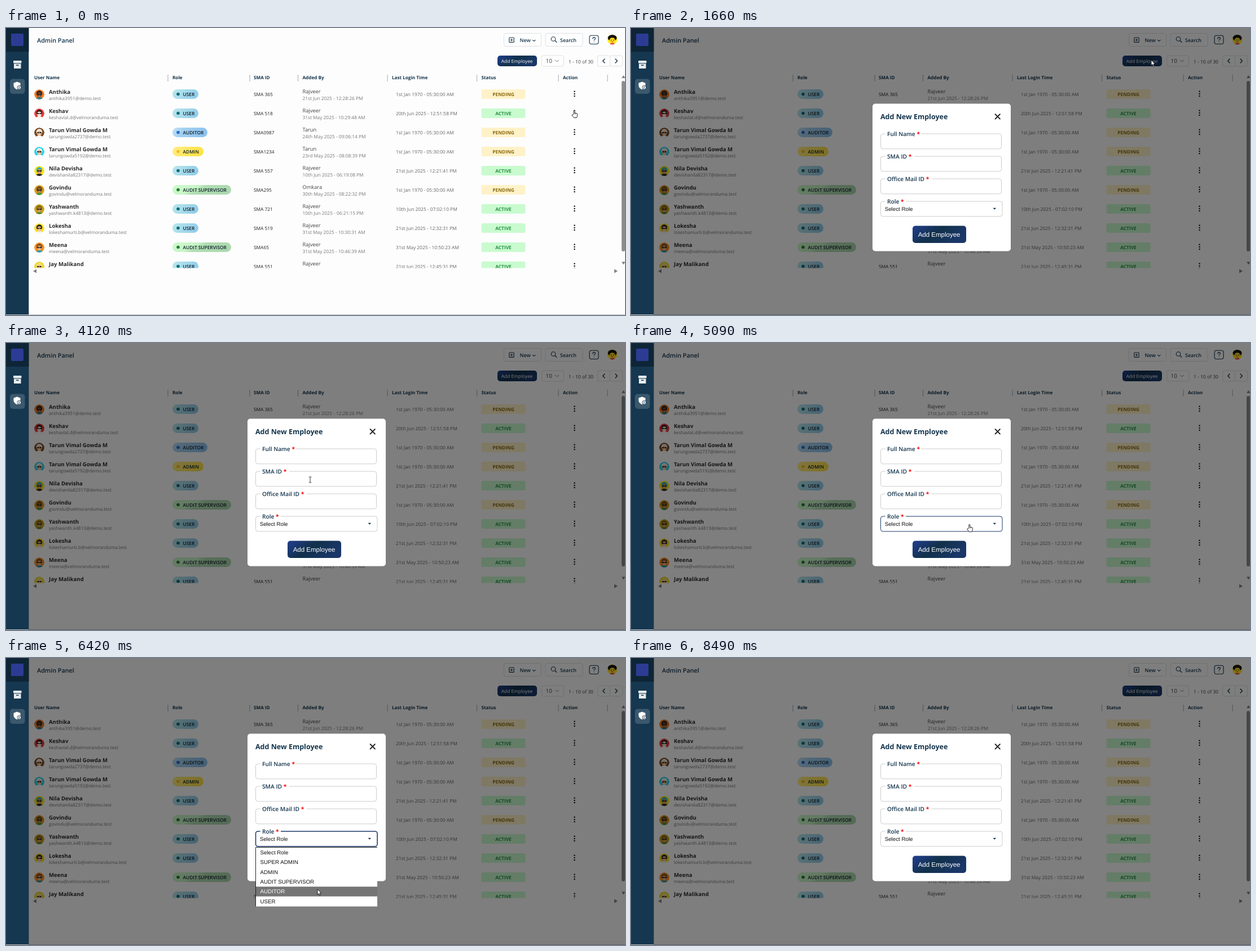
These frames come from a looping animation (1097x510 px, 8.66 s). An HTML page:

```html
<!DOCTYPE html>
<html lang="en">
<head>
<meta charset="utf-8">
<title>Admin Panel</title>
<style>
  html, body { margin: 0; width: 100%; height: 100%; overflow: hidden; background: #fdfdfd; }
  svg { display: block; width: 100vw; height: 100vh; }
  text { font-family: "Open Sans", "Noto Sans", sans-serif; text-rendering: geometricPrecision; white-space: pre; }
  .title { font-size: 10.8px; font-weight: 600; fill: #13344c; }
  .head { font-size: 8.15px; font-weight: 700; fill: #13344c; }
  .name { font-size: 9.6px; font-weight: 700; fill: #2a2a2a; }
  .mail { font-size: 8.1px; fill: #777; }
  .by { font-size: 9.25px; fill: #444; }
  .date { font-size: 8.33px; fill: #777; }
  .login { font-size: 8.4px; fill: #666; }
  .id { font-size: 8.35px; font-weight: 500; fill: #222; }
  .pill { font-size: 8.35px; font-weight: 600; fill: #10202c; }
  .status { font-size: 8.35px; font-weight: 700; text-anchor: middle; }
  .tool { font-size: 8.9px; font-weight: 600; fill: #13344c; }
  .count { font-size: 10px; fill: #444; }
  .range { font-size: 8.5px; fill: #444; }
  .heading { font-size: 12.5px; font-weight: 700; fill: #13344c; }
  .label { font-size: 10.2px; font-weight: 600; fill: #13344c; }
  .small { font-size: 8.35px; fill: #fff; }
  .big, .option { font-family: "Liberation Sans", Arial, sans-serif; }
  .big { font-size: 11.5px; fill: #fff; }
  .option { font-size: 9.75px; fill: #111; }
  .button { fill: #fefefe; stroke: #dde0e4; }
  .field { fill: #fff; stroke: #ccc; }
  .line { fill: none; stroke: #13344c; stroke-width: 1.1; stroke-linecap: round; stroke-linejoin: round; }
</style>
</head>
<body>
<script>
const LOOP = 8660;
const ROW = 34;
const OPTION = 17.33;

const text = (cls, x, y, str, extra = '') => `<text class="${cls}" x="${x}" y="${y}" ${extra}>${str}</text>`;
const rect = (x, y, w, h, r, attrs) => `<rect x="${x}" y="${y}" width="${w}" height="${h}" rx="${r}" ${attrs}/>`;
const circle = (x, y, r, fill) => `<circle cx="${x}" cy="${y}" r="${r}" fill="${fill}"/>`;
const path = (d, attrs = 'class="line"') => `<path d="${d}" ${attrs}/>`;
const group = (id, body, attrs = '') => `<g id="${id}" ${attrs}>${body}</g>`;
const gradient = (id, slant, ...stops) =>
  `<linearGradient id="${id}" x2="1" y2="${slant}">` +
  stops.map(([at, color]) => `<stop offset="${at}" stop-color="${color}"/>`).join('') + '</linearGradient>';

const ROLES = {
  'USER': { width: 46, dot: '#0b6e78', id: 'user' },
  'AUDITOR': { width: 62, dot: '#1f6fd0', id: 'auditor' },
  'ADMIN': { width: 55, dot: '#f9bd22', id: 'admin' },
  'AUDIT SUPERVISOR': { width: 104, dot: '#267d34', id: 'supervisor' },
};
const STATUSES = {
  PENDING: { back: '#fff2c8', ink: '#8a6a10' },
  ACTIVE: { back: '#c9fbcf', ink: '#2b9147' },
};

// name | mail | role | id | added by | added on | last login | status | avatar: back, hair, skin, shirt
const NEVER = '1st Jan 1970 - 05:30:00 AM';
const USERS = [
  `Anthika|anthika3951@demo.test|USER|SMA 365|Rajveer|21st Jun 2025 - 12:28:26 PM|${NEVER}|PENDING|#f47b20,#2b2320,#7a4526,#2d7f96`,
  `Keshav|keshavlal.d@velmoranduma.test|USER|SMA 518|Rajveer|31st May 2025 - 10:29:48 AM|20th Jun 2025 - 12:51:58 PM|ACTIVE|#ee3a3a,#2a1c1c,#f7e3d4,#ffffff`,
  `Tarun Vimal Gowda M|tarungowda2737@demo.test|AUDITOR|SMA0987|Tarun|24th May 2025 - 09:06:14 PM|${NEVER}|PENDING|#7b4b22,#f4efe6,#e9bd92,#ffffff`,
  `Tarun Vimal Gowda M|tarungowda5192@demo.test|ADMIN|SMA1234|Tarun|23rd May 2025 - 08:08:39 PM|${NEVER}|PENDING|#27d3ee,#f1f4f5,#e6b58c,#ffffff`,
  `Nila Devisha|devishanila82317@demo.test|USER|SMA 557|Rajveer|10th Jun 2025 - 06:19:08 PM|21st Jun 2025 - 12:21:41 PM|ACTIVE|#ffe60a,#20b3c4,#c98a52,#222222`,
  `Govindu|govindu@velmoranduma.test|AUDIT SUPERVISOR|SMA295|Omkara|30th May 2025 - 08:22:32 PM|${NEVER}|PENDING|#dd9a1c,#6a4a17,#9a6a2c,#3f9a45`,
  `Yashwanth|yashwanth.k4813@demo.test|USER|SMA 721|Rajveer|10th Jun 2025 - 06:21:15 PM|10th Jun 2025 - 07:02:10 PM|ACTIVE|#c9a21d,#7d6512,#b88a3a,#5f8a35`,
  `Lokesha|lokeshamurti.b@velmoranduma.test|USER|SMA 519|Rajveer|31st May 2025 - 10:30:31 AM|21st Jun 2025 - 12:32:31 PM|ACTIVE|#ffe11a,#26211c,#e7b98f,#f4f4f4`,
  `Meena|meena@velmoranduma.test|AUDIT SUPERVISOR|SMA65|Rajveer|31st May 2025 - 10:46:39 AM|31st May 2025 - 10:50:23 AM|ACTIVE|#fb8f1e,#7b4a1d,#dfa266,#2f9bb0`,
  `Jay Malikand|jaymalikand@demo.test|USER|SMA 551|Rajveer|31st May 2025 - 10:44:10 AM|21st Jun 2025 - 12:45:31 PM|ACTIVE|#e8d531,#f3e36b,#efc695,#7a9a40`,
].map(line => line.split('|'));

function avatar(x, y, colors) {
  const [back, hair, skin, shirt] = colors.split(',');
  return `<g transform="translate(${x} ${y})" clip-path="url(#round)">` +
    circle(0, 0, 9, back) +
    `<ellipse cy="9" rx="6.5" ry="4" fill="${shirt}"/>` +
    circle(0, -1.5, 5.2, hair) +
    `<ellipse cy="1" rx="3.8" ry="4.4" fill="${skin}"/>` +
    path('M-4-1h3.500v2h-3zM.5-1H4L3.500 1h-3z', 'fill="#222"') +
    path('M-1.500 3.300h3', 'stroke="#fff" stroke-width=".8"') + '</g>';
}

const profile = '<g transform="translate(1074.500 20.500)" clip-path="url(#round)">' +
  circle(0, 0, 9, '#ffee2e') + '<ellipse cy="9" rx="5" ry="3" fill="#e8384f"/>' +
  '<ellipse cy="-3" rx="8" ry="5.500" fill="#15110f"/>' + '<ellipse cy="1.500" rx="5" ry="4.800" fill="#ffd91c"/>' +
  circle(-2, 1, .8, '#15110f') + circle(2, 1, .8, '#15110f') + path('M-1.500 4h3', 'stroke="#d33" stroke-width="1"') + '</g>';

function userRow([name, mail, role, id, by, added, login, status, colors], i) {
  const r = ROLES[role], s = STATUSES[status];
  return `<g transform="translate(0 ${i * ROW})">` +
    avatar(59, 118, colors) +
    text('name', 76, 116.5, name) + text('mail', 76, 127.7, mail) +
    rect(295, 109, r.width, 17, 8.5, `fill="url(#${r.id})"`) + circle(305, 117.5, 2.8, r.dot) +
    text('pill', 313.5, 120.7, role) + text('id', 439, 120.8, id) +
    text('by', 525.5, 116.2, by) + text('date', 525.5, 127.7, added) +
    text('login', 691, 120.8, login) +
    rect(842.5, 109, 78, 17, 3, `fill="${s.back}"`) +
    text('status', 881.5, 120.7, status, `fill="${s.ink}"`) +
    [112.7, 116.9, 121.1].map(y => circle(1007.5, y, 1.25, '#111')).join('') + '</g>';
}

const defs = '<defs><clipPath id="round"><circle r="9"/></clipPath>' +
  '<clipPath id="table"><rect x="41" y="98" width="1045" height="328.500"/></clipPath>' +
  gradient('user', .2, [0, '#bbe7ec'], [1, '#92ceea']) +
  gradient('auditor', .2, [0, '#c6e2f6'], [.35, '#a3d0f0'], [1, '#8ec3ee']) +
  gradient('admin', .2, [0, '#ffee86'], [1, '#ffe245']) +
  gradient('supervisor', .3, [0, '#cdfacb'], [.43, '#c8f5c7'], [.55, '#b0ddb2'], [1, '#acd9af']) +
  gradient('navy', .4, [0, '#223f90'], [.5, '#11304a'], [1, '#1a3768']) + '</defs>';

const sidebar = rect(0, 0, 40.3, 510, 0, 'fill="#15374f"') + rect(0, 0, 40.3, 42, 0, 'fill="#0d2536"') +
  rect(9, 10, 22, 22, 2, 'fill="#2c3c94"') +
  rect(13, 58, 14.5, 4.5, 1, 'fill="#e6ebee"') +
  path('M14 63.500h12.500v8.500h-12.500zM18 65.500v1.500h4.500v-1.500z', 'fill="#e6ebee" fill-rule="evenodd"') +
  rect(7, 90.5, 26.5, 26.5, 5, 'fill="#3b586d"') +
  path('M19.500 95.500l6 2.300v4c0 3.500-2.500 6.200-6 7.400-3.500-1.200-6-3.900-6-7.400v-4z', 'fill="#fff"') +
  circle(23.3, 105.8, 3.7, '#3b586d') + circle(23.3, 105.8, 2.8, '#fff') +
  circle(23.3, 104.9, .9, '#3b586d') + path('M21.700 107.300q1.600-1.500 3.200 0', 'stroke="#3b586d" fill="none"');

const toolbar = text('title', 55, 25.5, 'Admin Panel') +
  rect(882.5, 9.5, 66, 23, 3, 'class="button"') + rect(891.8, 17, 8.4, 8.4, 1, 'class="line"') +
  path('M896 19.300v3.800M894.100 21.200h3.800') + text('tool', 910.5, 24.8, 'New') + path('M933.500 21.300l2.300 2 2.300-2') +
  rect(956, 9.5, 66, 23, 3, 'class="button"') +
  '<circle cx="970" cy="19.500" r="3.800" class="line"/>' + path('M973 22.500l3 3') + text('tool', 982, 24.8, 'Search') +
  rect(1034, 13.2, 16, 15.3, 3.5, 'class="line"') +
  path('M1039.800 19q0-2.400 2.300-2.400t2.300 2.200c0 1.500-2.300 1.600-2.300 3.200M1042.100 24.600v.1') + profile;

const addButton = group('add', rect(871, 49, 70, 19, 5, 'id="addBack" fill="url(#navy)"') +
  text('small', 877.8, 61.5, 'Add Employee'));

const pager = rect(949.5, 49, 39, 19, 3, 'class="button"') + text('count', 956.5, 62.2, '10') +
  path('M973.500 57l3 3 3-3', 'class="line" style="stroke:#666;stroke-width:.9"') +
  text('range', 997, 62.6, '1 - 10 of 30') +
  rect(1048.5, 49, 22, 19, 3, 'class="button"') + rect(1070.5, 49, 22, 19, 3, 'class="button"') +
  path('M1061 55l-3.300 3.500 3.300 3.500M1080 55l3.300 3.500-3.300 3.500', 'class="line" style="stroke-width:1.4"');

const HEADERS = [[50, 'User Name'], [295, 'Role'], [439, 'SMA ID'], [525.5, 'Added By'],
  [684, 'Last Login Time'], [842.5, 'Status'], [987, 'Action']];
const table = HEADERS.map(([x, label]) => text('head', x, 91, label)).join('') +
  [287, 432, 517.5, 676, 834.5, 979, 1066].map(x => path(`M${x} 83v12`, 'stroke="#bcc4cd" stroke-width="1.500"')).join('') +
  `<g clip-path="url(#table)">${USERS.map(userRow).join('')}</g>` +
  path('M1091 89h6.500l-3.200-5zM1091 415.500h6.500l-3.200 5zM54 428.500v7l-6-3.500zM1078 428.500v7l6-3.500z', 'fill="#808080"') +
  rect(1091, 94, 6, 303, 3, 'fill="#8d8d8d"') + rect(0, 509, 1097, 1, 0, 'fill="#bdbdbd"');

const FIELDS = [['Full Name', 188, 514], ['SMA ID', 228, 502], ['Office Mail ID', 268, 533], ['Role', 308, 487]];
const formField = ([label, y, gapEnd], i) =>
  rect(442.5, y, i === 3 ? 215.5 : 214, 26.8, 4, `class="field" ${i === 3 ? 'id="select"' : ''}`) +
  rect(450.5, y - 2, gapEnd - 450.5, 4, 0, 'fill="#fff"') +
  text('label', 454, y + 3.6, `${label} <tspan fill="#f00" font-weight="700">*</tspan>`);

const OPTIONS = ['Select Role', 'SUPER ADMIN', 'ADMIN', 'AUDIT SUPERVISOR', 'AUDITOR', 'USER'];
const dropdown = rect(442.5, 336.5, 215.5, 105, 0, 'fill="#fff"') +
  path('M658 336.500H442.500V441.500', 'fill="none" stroke="#222"') +
  rect(443, 337, 215, OPTION, 0, 'id="highlight" fill="#757575"') +
  OPTIONS.map((label, i) => text('option', 450.5, 348.9 + i * OPTION, label)).join('');

const modal = rect(40, 0, 1057, 510, 0, 'fill="#000" fill-opacity=".5"') +
  rect(428, 134.5, 245, 262, 5, 'fill="#fff"') +
  text('heading', 442, 162.3, 'Add New Employee') +
  path('M645.500 153.200l8.400 8.400m0-8.400l-8.400 8.400', 'stroke="#111" stroke-width="1.800" stroke-linecap="round"') +
  FIELDS.map(formField).join('') +
  text('option', 449.7, 324.6, 'Select Role') + path('M641.500 319.800h5.600l-2.800 3z', 'fill="#13344c"') +
  rect(499, 351.5, 95, 30.5, 5, 'fill="url(#navy)"') + text('big', 508.7, 370.7, 'Add Employee') +
  group('dropdown', dropdown);

const OUTLINE = 'fill="#fff" stroke="#111" stroke-width=".9" stroke-linejoin="round"';
const cursors =
  group('arrow', path('M0 0v9.500l2.200-2 1.500 3.400 1.600-.7-1.500-3.300h3z', OUTLINE)) +
  group('hand', path('M-1 7V1q1-1.500 2 0v4l4 1q1 .4.800 1.700L5 11.500l-.8 2H-.5L-4 9q0-1.500 1.500-1z', OUTLINE) + path('M1 5v2.500M3 5.600v2', 'stroke="#111" stroke-width=".6"')) +
  group('beam', path('M-2.300-5H-.4L0-4.500.4-5h1.900M0-4.500v9M-2.300 5H-.4L0 4.500.4 5h1.900', 'fill="none" stroke="#222" stroke-width=".9"'));

document.body.innerHTML = `<svg viewBox="0 0 1097 510">${defs}${rect(0, 0, 1097, 510, 0, 'fill="#fdfdfd"')}` +
  sidebar + toolbar + pager + addButton + table + group('modal', modal) + group('cursor', cursors) + '</svg>';

// Pointer track: time, x, y
const TRACK = [[0, 1007, 146], [40, 1007, 146], [780, 922, 57], [1680, 922, 57], [2460, 583, 187], [2520, 584, 188],
  [3150, 584, 188], [3420, 592, 203], [4040, 540, 242], [4120, 539, 243], [4400, 539, 243], [4860, 599, 358],
  [5190, 600, 312], [5740, 600, 312], [6420, 552, 411], [6620, 551, 424], [6700, 551, 429], [7240, 551, 429], [7480, 990, 509]];

function pointerAt(t) {
  const next = TRACK.findIndex(([time]) => time > t);
  if (next < 0) return TRACK.at(-1).slice(1);
  const [t0, x0, y0] = TRACK[next - 1], [t1, x1, y1] = TRACK[next];
  const p = (t - t0) / (t1 - t0), eased = p * p * (3 - 2 * p);
  return [x0 + (x1 - x0) * eased, y0 + (y1 - y0) * eased];
}

const el = id => document.getElementById(id);
const show = (id, on) => { el(id).style.display = on ? '' : 'none'; };
const options = [...el('dropdown').querySelectorAll('text')];

function render(t) {
  const [x, y] = pointerAt(t);
  const modalOpen = t >= 1660;
  const listOpen = t >= 5470 && t < 8490;
  const inside = modalOpen && x > 442 && x < 658;
  const onSelect = inside && y > 308 && y < 335;
  const onField = inside && FIELDS.slice(0, 3).some(([, top]) => y >= top && y < top + 27);
  const kind = t < 100 || onSelect ? 'hand' : onField ? 'beam' : 'arrow';

  for (const id of ['arrow', 'hand', 'beam']) show(id, id === kind);
  el('cursor').setAttribute('transform', `translate(${x} ${y})`);
  show('cursor', t < 7770);

  const hover = !modalOpen && x < 941 && y < 68;
  el('add').setAttribute('transform', `translate(0 ${hover ? -.5 : 0})`);
  el('addBack').style.filter = hover ? 'drop-shadow(0 4px 4px #2846a099) drop-shadow(0 0 8px #0000000c)' : '';

  show('modal', modalOpen);
  show('dropdown', listOpen);
  el('select').style.stroke = listOpen || onSelect ? '#1b3a6b' : '';
  el('select').style.strokeWidth = listOpen ? 1.6 : 1;

  const active = Math.min(5, Math.max(0, Math.floor((y - 337) / OPTION)));
  el('highlight').setAttribute('y', 337 + active * OPTION);
  options.forEach((option, i) => { option.style.fill = i === active ? '#fff' : ''; });
}

function tick() {
  render(performance.now() % LOOP);
  requestAnimationFrame(tick);
}
tick();
</script>
</body>
</html>
```
